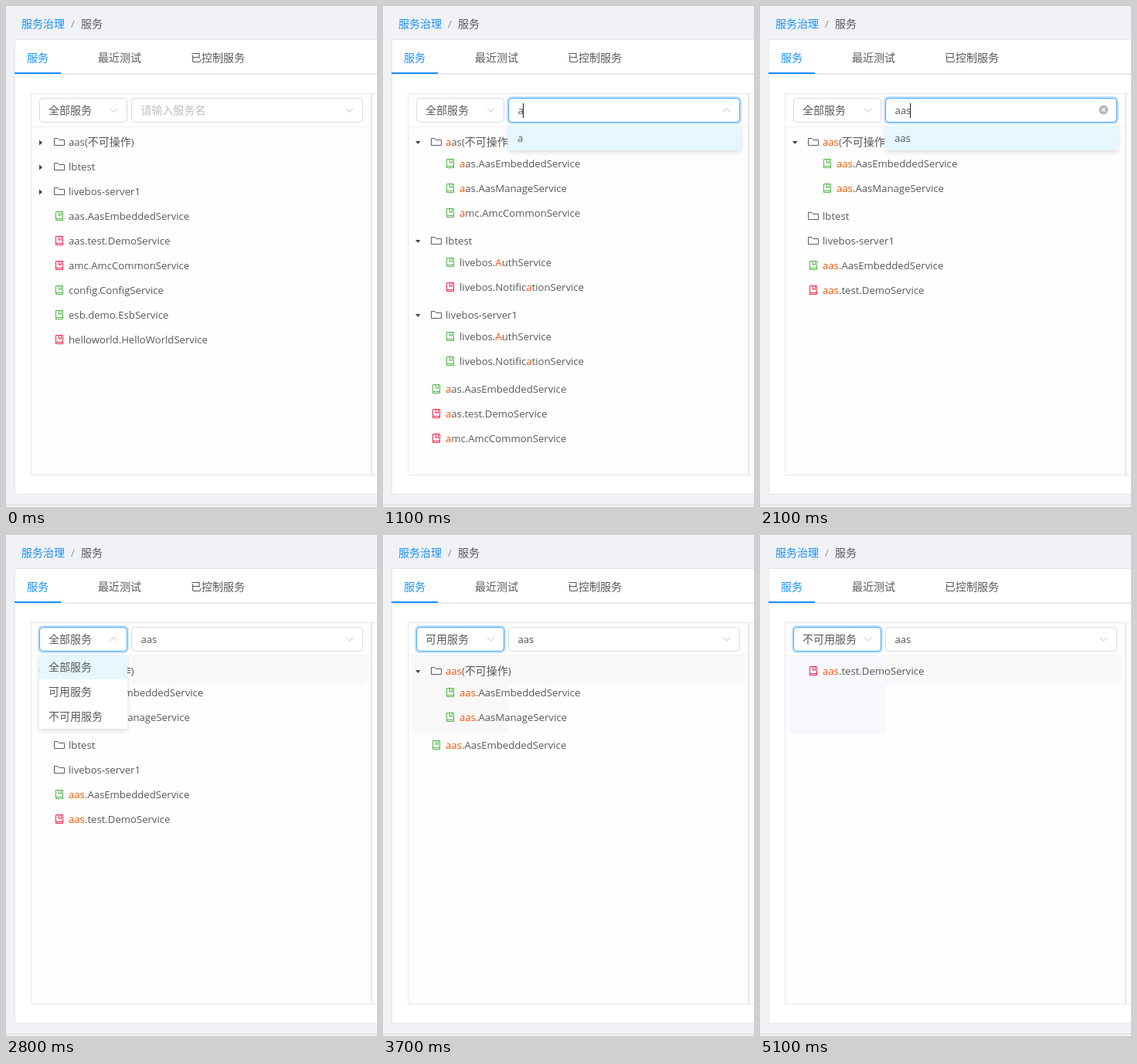
Write an HTML page that moves like this. It is 480x649 px and loops after 5.7 s.

```html
<!DOCTYPE html>
<html lang="zh-CN">
<meta charset="utf-8">
<title>服务治理</title>
<style>
  html, body { margin: 0; height: 100%; overflow: hidden; background: #f0f2f5; }
  svg { display: block; width: 480px; height: 649px; }
  text { font: 13.15px "Open Sans", "Noto Sans CJK SC", "Noto Sans CJK", sans-serif; white-space: pre; }
  .cjk { font-size: 14px; }
</style>
<svg id="stage" viewBox="0 0 480 649"></svg>
<script>
const LOOP = 5700, STEP = 100;
const BLUE = '#1890ff', INK = '#595959', MUTED = '#bfbfbf', MATCH = '#ff5000';
const GREEN = '#4fb848', RED = '#f5224d';
const FILTERS = ['全部服务', '可用服务', '不可用服务'];

// First letter: c/o/e = closed, open, empty folder; g/r = service; G/R = nested service
const TREES = {
  all: ['caas(不可操作)', 'clbtest', 'clivebos-server1', 'gaas.AasEmbeddedService', 'raas.test.DemoService',
    'ramc.AmcCommonService', 'gconfig.ConfigService', 'gesb.demo.EsbService', 'rhelloworld.HelloWorldService'],
  a: ['oaas(不可操作)', 'Gaas.AasEmbeddedService', 'Gaas.AasManageService', 'Gamc.AmcCommonService',
    'olbtest', 'Glivebos.AuthService', 'Rlivebos.NotificationService',
    'olivebos-server1', 'Glivebos.AuthService', 'Glivebos.NotificationService',
    'gaas.AasEmbeddedService', 'raas.test.DemoService', 'ramc.AmcCommonService'],
  aas: ['oaas(不可操作)', 'Gaas.AasEmbeddedService', 'Gaas.AasManageService', 'elbtest', 'elivebos-server1',
    'gaas.AasEmbeddedService', 'raas.test.DemoService'],
  usable: ['oaas(不可操作)', 'Gaas.AasEmbeddedService', 'Gaas.AasManageService', 'gaas.AasEmbeddedService'],
  unusable: ['raas.test.DemoService']
};

// Latest value whose start time has passed
const at = (t, ...keys) => keys.filter(k => k[0] <= t).pop()[1];
const ramp = (t, start) => Math.max(0, Math.min(1, (t - start + STEP) / 300));
const pulse = (t, open, close) => ramp(t, open) - ramp(t, close);

const rect = (x, y, w, h, fill, more = '') =>
  `<rect x="${x}" y="${y}" width="${w}" height="${h}" fill="${fill}" ${more}/>`;
const line = (d, stroke, more = '') => `<path d="${d}" fill="none" stroke="${stroke}" ${more}/>`;

function label(x, y, s, fill = INK, query = '', weight = 400) {
  const cjk = p => p.replace(/[\u4e00-\u9fff]+/g, m => `<tspan class="cjk">${m}</tspan>`);
  const i = query ? s.toLowerCase().indexOf(query) : -1;
  const n = i + query.length;
  const body = i < 0 ? cjk(s) :
    cjk(s.slice(0, i)) + `<tspan fill="${MATCH}">${s.slice(i, n)}</tspan>` + cjk(s.slice(n));
  return `<text x="${x}" y="${y + 5}" fill="${fill}" font-weight="${weight}" style="font-weight:${weight}">${body}</text>`;
}

function folder(y, kind) {
  const caret = { c: `M43 ${y - 2.5}l4 3.5-4 3.5z`, o: `M42 ${y - 1}h6.4l-3.2 4z`, e: '' }[kind];
  return `<path d="${caret}" fill="#444"/>` +
    line(`M62.5 ${y + 4.5}v-9h4.6l1.6 2h6.8v7z`, '#5f5a62');
}

const book = (x, y, color) =>
  line(`M${x + .5} ${y - 5.5}h9v11h-9zM${x + .5} ${y + 3.5}h9M${x + 4.5} ${y - 5}v4.5l1.5-1 1.5 1v-4.5`, color);

const tree = (rows, query) => rows.map((row, i) => {
  const kind = row[0], name = row.slice(1), y = 176 + 32 * i;
  if ('coe'.includes(kind)) return folder(y, kind) + label(81, y, name, INK, query);
  const nested = kind < 'a', dx = nested ? 18 : 0, cy = nested ? y - 4 : y;
  return book(64 + dx, cy, /g/i.test(kind) ? GREEN : RED) + label(81 + dx, cy, name, INK, query);
}).join('');

const arrow = (x, turn) =>
  line('M-4.5 -2.2L0 2.3 4.5 -2.2', MUTED, `transform="translate(${x} 135) rotate(${180 * turn})"`);

const field = (x, w, focus, glow) =>
  rect(x - 1, 118, w + 2, 34, 'none', `rx="5" stroke="${BLUE}" stroke-width="2" opacity="${.25 * glow}"`) +
  rect(x + .5, 119.5, w - 1, 31, '#fff', 'rx="4" stroke="#d9d9d9"') +
  rect(x + .5, 119.5, w - 1, 31, 'none', `rx="4" stroke="#40a9ff" opacity="${focus}"`);

function menu(x, w, items, active, selected, open) {
  if (!open) return '';
  const rows = items.map((s, i) => {
    const fill = i === active ? '#e6f7ff' : i === selected ? '#fafafa' : '#fff';
    return rect(x, 155 + 32 * i, w, 32, fill, 'rx="3"') +
      label(x + 12, 171 + 32 * i, s, INK, '', i === selected && i > 0 ? 600 : 400);
  }).join('');
  return `<g opacity="${open}" transform="translate(0 ${155 * .2 * (1 - open)}) scale(1 ${.8 + .2 * open})">` +
    rect(x, 155, w, 32 * items.length, '#fff', 'rx="4" filter="url(#shadow)"') + rows + '</g>';
}

const FRAME = `<defs><filter id="shadow" x="-20%" y="-50%" width="140%" height="200%">
    <feDropShadow dx="0" dy="2" stdDeviation="3" flood-opacity=".15"/></filter></defs>` +
  rect(0, 0, 480, 649, '#f0f2f5') +
  label(20, 23, '服务治理', BLUE) + label(84, 23, '/', '#8c8c8c') + label(97, 23, '服务') +
  rect(11.5, 43.5, 480, 589, '#fff', 'stroke="#e6e7ea"') +
  rect(12, 87, 468, 2, '#e8e8e8') + rect(11, 86, 60, 2, BLUE) +
  label(27, 67, '服务', BLUE) + label(119, 67, '最近测试') + label(239, 67, '已控制服务') +
  rect(32.5, 113.5, 440, 494, '#fefefe', 'stroke="#e8e8e8"') +
  rect(473.5, 113.5, 20, 494, '#fefefe', 'stroke="#e8e8e8"') +
  rect(33, 156, 439, 1, '#f0f0f0') + rect(0, 646, 480, 1, '#d9dadd');

function render(t) {
  const typed = at(t, [0, ''], [600, 'a'], [1300, 'aa'], [1700, 'aas']);
  const query = at(t, [0, ''], [1100, 'a'], [1300, 'aa'], [1700, 'aas']);
  const rows = TREES[at(t, [0, 'all'], [1100, 'a'], [1300, 'aas'], [3700, 'usable'], [5100, 'unusable'])];
  const filter = at(t, [0, 0], [3300, 1], [4900, 2]);
  const hover = at(t, [0, 0], [3200, 1], [4600, 2]);
  const blur = 1 - ramp(t, 2500);
  const focus = at(t, [0, 0], [300, .5], [400, 1]) * blur;
  const suggest = pulse(t, 600, 2500);
  const picker = pulse(t, 2500, 3300) + pulse(t, 4200, 4900);
  const caret = at(t, [0, 0], [400, 1], [2200, 0]);
  const clear = at(t, [0, 0], [2100, 1], [2500, 0]);

  // Faint tint left where the menus were
  let tint = '';
  if (t >= 2600) tint += `<path d="M162 157H468V187q0 7-7 7H162z" fill="#f8f8f8"/>`;
  if (t >= 3500) tint += `<path d="M37 157H163V251q0 7-7 7H44q-7 0-7-7z" fill="${t < 5100 ? '#f8f8f8' : '#f8f8fe'}"/>`;

  const picked = ramp(t, 2500);
  return FRAME + tint + tree(rows, query) +
    field(43, 114, picked, picked) + label(55, 135, FILTERS[filter]) + arrow(139.5, picker) +
    field(162, 300, focus, ramp(t, 600) * blur) +
    (typed ? label(174.5, 135, typed) : label(174.5, 135, '请输入服务名', MUTED)) +
    (caret ? rect(Math.floor(174.5 + 6.7 * typed.length), 126, 1, 19, '#222') : '') +
    (clear ? `<circle cx="444.5" cy="134.5" r="6" fill="#b8b8b8"/>` + line('M442.4 132.4l4.2 4.2m0-4.2l-4.2 4.2', '#fff', 'stroke-width="1.2"')
      : arrow(444.5, suggest)) +
    menu(162, 301, [typed], 0, -1, suggest) +
    menu(43, 114, FILTERS, hover, filter, picker);
}

const stage = document.getElementById('stage');
let shown = -1;
function tick() {
  const t = Math.floor(performance.now() % LOOP / STEP) * STEP;
  if (t !== shown) stage.innerHTML = render(shown = t);
  requestAnimationFrame(tick);
}
tick();
</script>
</html>
```
